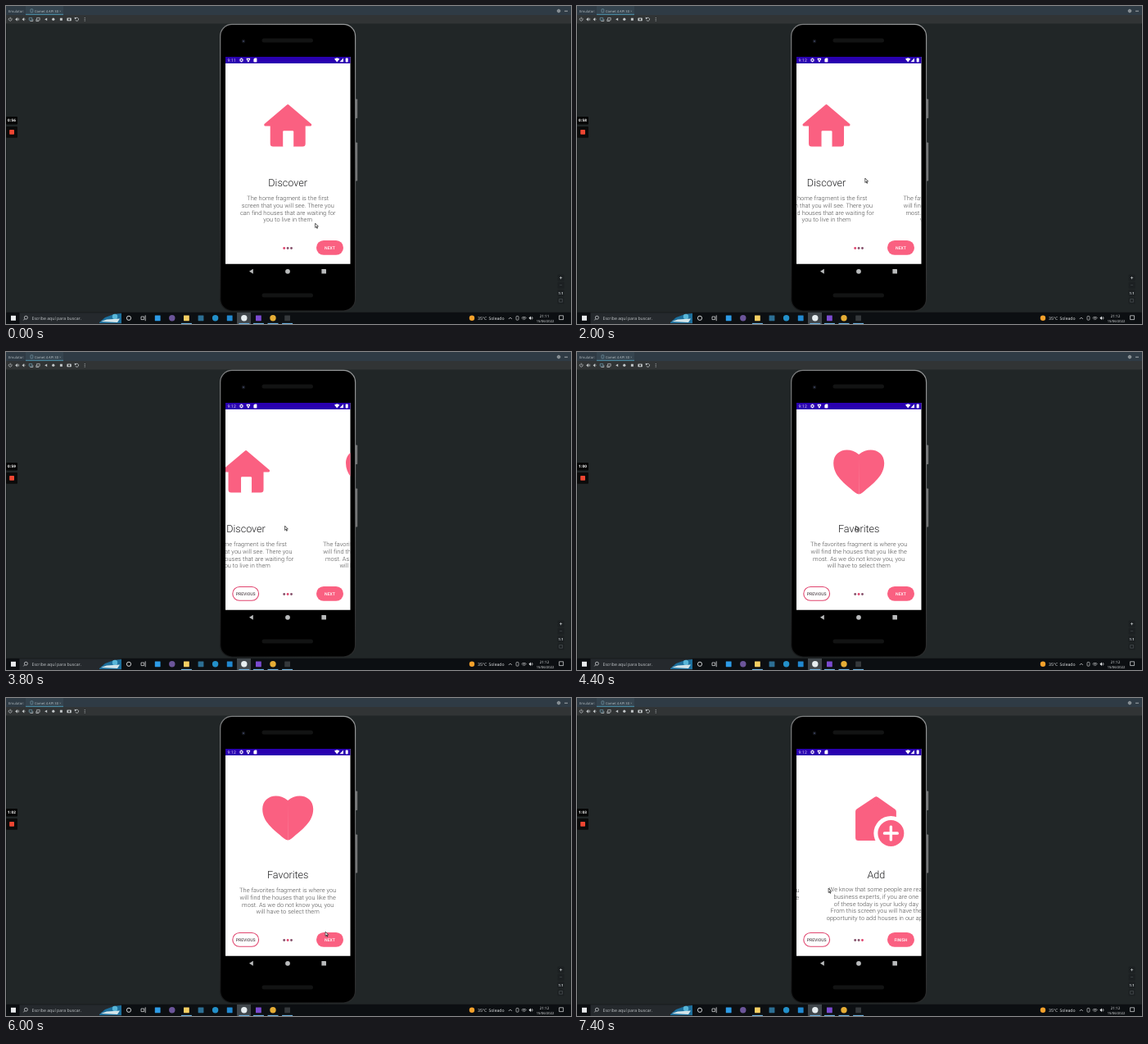
These frames come from a looping animation (690 by 388 pixels, 7.5 s). An HTML page with a canvas:

```html
<!DOCTYPE html>
<html lang="es">
<head>
<meta charset="utf-8">
<title>Onboarding demo</title>
<style>
html, body { margin: 0; width: 100%; height: 100%; overflow: hidden; background: #212627; }
canvas { display: block; width: 690px; height: 388px; }
</style>
</head>
<body>
<canvas id="stage"></canvas>
<script>
const W = 690, H = 388, LOOP = 7500, STEP = 100;
const PINK = '#fa6081', ROSE = '#e0446e', INK = '#c3c8ca', PURPLE = '#2900b0';
const ROBOTO = 'Roboto, sans-serif', UI = '"Open Sans", "Noto Sans", sans-serif';
const SCREEN = { x: 268, y: 62, w: 152.5, h: 252.7 };
const PAGE_W = 153, MID = 344.2;

const canvas = document.getElementById('stage');
const ctx = canvas.getContext('2d');
const dpr = window.devicePixelRatio || 1;
canvas.width = Math.round(W * dpr);
canvas.height = Math.round(H * dpr);
ctx.scale(dpr, dpr);
ctx.textRendering = 'geometricPrecision';
ctx.lineJoin = 'round';

// Each move: start, end, value(s) reached
const swipes = [
  [0, 1, 0], [1800, 2400, 1], [2800, 3000, .667], [3200, 3500, 0],
  [3610, 4100, 1], [4500, 5000, .805], [5100, 5400, 1], [7000, 7522, 2]
];
const pointer = [
  [0, 1, 377.6, 265], [300, 1000, 370.6, 212], [1800, 2200, 333, 208], [2800, 3000, 384, 208],
  [3400, 3800, 340.5, 212], [4500, 5000, 388, 206.5], [5400, 5800, 390, 285],
  [6000, 6500, 384, 230], [7000, 7300, 307, 232]
];

const pages = [
  { title: 'Discover', icon: house, top: 237.2, lines: [
    'The home fragment is the first', 'screen that you will see. There you',
    'can find houses that are waiting for', 'you to live in them'] },
  { title: 'Favorites', icon: heart, top: 237.2, lines: [
    'The favorites fragment is where you', 'will find the houses that you like the',
    'most. As we do not know you, you', 'will have to select them'] },
  { title: 'Add', icon: addHouse, top: 236, lines: [
    'We know that some people are real', 'business experts, if you are one',
    'of these today is your lucky day', 'From this screen you will have the',
    'opportunity to add houses in our app'] }
];

const ease = k => k * k * (3 - 2 * k);

function follow(moves, t) {
  let at = moves[0].slice(2);
  for (const [start, end, ...to] of moves) {
    const k = ease(Math.min(1, Math.max(0, (t - start) / (end - start))));
    at = at.map((v, i) => v + (to[i] - v) * k);
  }
  return at;
}

function rect(x, y, w, h, fill, r = 0) {
  ctx.beginPath();
  ctx.roundRect(x, y, w, h, r);
  ctx.fillStyle = fill;
  ctx.fill();
}

function box(x, y, w, h, color, width = .7, r = 0) {
  ctx.beginPath();
  ctx.roundRect(x, y, w, h, r);
  ctx.strokeStyle = color;
  ctx.lineWidth = width;
  ctx.stroke();
}

const square = (x, y, size, fill, r) => rect(x - size / 2, y - size / 2, size, size, fill, r);

function disc(x, y, r, fill) {
  ctx.beginPath();
  ctx.arc(x, y, r, 0, Math.PI * 2);
  ctx.fillStyle = fill;
  ctx.fill();
}

function ring(x, y, r, color, width = .7, from = 0, to = Math.PI * 2) {
  ctx.beginPath();
  ctx.arc(x, y, r, from, to);
  ctx.strokeStyle = color;
  ctx.lineWidth = width;
  ctx.stroke();
}

function trace(pts) {
  ctx.beginPath();
  for (let i = 0; i < pts.length; i += 2) ctx.lineTo(pts[i], pts[i + 1]);
}

function line(color, width, ...pts) {
  trace(pts);
  ctx.strokeStyle = color;
  ctx.lineWidth = width;
  ctx.stroke();
}

// Filled polygon; a radius grows it with rounded corners
function poly(color, radius, ...pts) {
  trace(pts);
  ctx.closePath();
  ctx.fillStyle = ctx.strokeStyle = color;
  ctx.fill();
  ctx.lineWidth = radius * 2;
  if (radius) ctx.stroke();
}

function text(str, x, y, font, color, align = 'left', spacing = 0) {
  ctx.font = font;
  ctx.letterSpacing = spacing + 'px';
  ctx.fillStyle = color;
  ctx.textAlign = align;
  ctx.fillText(str, x, y);
}

function at(x, y, paint) {
  ctx.save();
  ctx.translate(x, y);
  paint();
  ctx.restore();
}

function house() {
  poly(PINK, 1.6, 0, 121.6, 27.4, 145, -27.4, 145);
  rect(-21.5, 140, 43, 31.5, PINK, 3.5);
  rect(-6, 152.3, 13, 20, '#fff', 1.2);
}

function heart() {
  ctx.fillStyle = PINK;
  for (const side of [-1, 1]) {
    ctx.beginPath();
    ctx.moveTo(0, 125);
    ctx.bezierCurveTo(side * 13, 114, side * 31, 120, side * 31, 135.5);
    ctx.bezierCurveTo(side * 31, 151, side * 18, 160, side * 4.5, 171.6);
    ctx.quadraticCurveTo(side * 2, 173.6, 0, 173.6);
    ctx.lineTo(-side * .2, 125);
    ctx.fill();
  }
}

function addHouse() {
  poly(PINK, 3.5, 0, 123.8, 21, 138.5, 21, 170.5, -21.8, 170.5, -21.8, 138.5);
  disc(18, 165, 21, '#fff');
  disc(18, 165, 16, PINK);
  rect(8.5, 163.3, 19, 3.4, '#fff', 1.5);
  rect(16.3, 155.5, 3.4, 19, '#fff', 1.5);
}

function gear(x, y, r, color) {
  for (let i = 0; i < 8; i++) ring(x, y, r * .9, color, r * .3, i * Math.PI / 4 - .2, i * Math.PI / 4 + .2);
  ring(x, y, r * .58, color, r * .42);
}

function speaker(x, y, waves, color = INK) {
  poly(color, 0, x - 2.2, y, x + .4, y - 2.2, x + .4, y + 2.2);
  for (let i = 1; i <= waves; i++) ring(x + .2, y, i * 1.1, color, .6, -.9, .9);
}

const tools = [
  () => { ring(0, 0, 1.9, INK, .7, -1, 4.1); line(INK, .7, 0, -2.6, 0, 0); },
  () => speaker(0, 0, 2),
  () => speaker(0, 0, 1),
  () => { box(-2.2, -1.8, 3.6, 2.8, '#6f9fb4'); line(INK, .7, -1, 2.3, 2.4, 2.3, 2.4, 0); },
  () => { box(-1.6, -1.8, 3.6, 2.8, INK); line(INK, .7, -2.4, 0, -2.4, 2.3, 1, 2.3); },
  () => poly(INK, 0, -1, 0, 2, -1.7, 2, 1.7),
  () => disc(.4, 0, 1.6, INK),
  () => square(.6, 0, 3, INK),
  () => { rect(-2, -1.8, 5.4, 3.8, INK, .6); disc(.7, .2, 1.1, '#313435'); },
  () => { ring(.4, 0, 2, INK, .8, -2.6, 2.6); poly(INK, 0, -2.6, -2.4, 0, -2, -2, .2); },
  () => { for (const y of [-1.8, 0, 1.8]) disc(0, y, .5, INK); }
];

function drawIde() {
  rect(0, 0, W, H, '#212627');
  rect(0, 0, W, 11, '#2f3b45');
  rect(24, 0, 46, 11, '#35444f');
  rect(24, 9.7, 46, 1.2, '#47849b');
  rect(0, 11, W, 10.5, '#313435');
  for (const x of [0, W - .8]) rect(x, 21.5, .8, 352, '#171c1e');
  text('Emulator:', 3, 7.8, '4.2px ' + UI, '#b4bdc1');
  box(30, 3.8, 2.8, 4, '#7fa6b5', .6, .5);
  text('Comet 4 API 30', 35, 7.8, '4.1px ' + UI, '#bcc6ca');
  text('×', 65, 7.8, '4.5px ' + UI, '#8b979c');
  gear(675, 6, 2.2, INK);
  line(INK, .8, 682, 6.2, 686, 6.2);
  tools.forEach((tool, i) => at(5.2 + 8.1 * i + .1 * i * i, 16.2, tool));

  for (let i = 0; i < 4; i++) square(677.6, 331.4 + i * 9.4, 8, '#1c2022', 1);
  text('+', 677.6, 333.7, 'bold 6.5px ' + UI, INK, 'center');
  text('−', 677.6, 343, '6.5px ' + UI, '#596164', 'center');
  text('1:1', 677.6, 351.8, 'bold 4.2px ' + UI, INK, 'center');
  box(675.6, 357.6, 4, 3.6, '#4c5457');
}

function drawPhone() {
  const rim = ctx.createLinearGradient(261, 372, 427, 22);
  rim.addColorStop(0, '#161718');
  rim.addColorStop(.5, '#48494a');
  rim.addColorStop(1, '#9a9c9d');
  for (const [y, h] of [[113.5, 23.5], [166.5, 47]]) rect(426.5, y, 2.7, h, '#77797a', .8);
  rect(261, 21.8, 166.2, 350.6, rim, 15);
  rect(262.3, 23, 163.7, 348.4, '#000', 14);
  disc(290, 43, 2.4, '#101216');
  disc(290, 43, 1.1, '#39405a');
  for (const y of [39.6, 350.6]) rect(312.5, y, 62.5, 5, '#121313', 2.5);
  rect(SCREEN.x, SCREEN.y, SCREEN.w, SCREEN.h, '#fff');
  poly('#b9bbbc', 0, 297, 323.8, 301.8, 320.8, 301.8, 326.8);
  disc(344, 323.8, 2.9, '#b9bbbc');
  square(388.2, 323.8, 5.6, '#b9bbbc', .4);
}

function drawStatusBar(late) {
  rect(SCREEN.x, SCREEN.y, SCREEN.w, 8, PURPLE);
  text(late ? '9:12' : '9:11', 270.6, 67.9, '5.1px ' + ROBOTO, '#dcd5f5', 'left', .15);
  gear(287.5, 66, 2.5, '#fff');
  poly('#fff', .6, 294.2, 64.4, 297.6, 64.4, 295.9, 68);
  disc(295.9, 65.6, .8, PURPLE);
  rect(302.4, 63.5, 4, 4.9, '#fff', [2, .4, .4, .4]);
  poly('#fff', 0, 401, 64.4, 404.2, 63.3, 407.4, 64.4, 404.2, 68.4);
  poly('#fff', 0, 412, 63.6, 412, 68.2, 407.6, 68.2);
  rect(414.7, 63.4, 3, 5, '#fff', .6);
}

function drawPage(page) {
  page.icon();
  text(page.title, 0, 219.6, '300 12.6px ' + ROBOTO, '#1c1c1e', 'center');
  page.lines.forEach((s, i) =>
    text(s, 0, page.top + i * 8.75, '300 7.4px ' + ROBOTO, '#4c4c4c', 'center', .07));
}

function drawApp(t) {
  const [pos] = follow(swipes, t);
  const last = t >= 7300;
  const hasPrev = t >= 2300 && (t < 3400 || t >= 3700);
  const current = last ? 2 : hasPrev ? 1 : 0;
  const label = '500 5.1px ' + ROBOTO;

  ctx.save();
  ctx.beginPath();
  ctx.rect(SCREEN.x, SCREEN.y, SCREEN.w, SCREEN.h);
  ctx.clip();
  pages.forEach((p, i) => {
    if (Math.abs(i - pos) < 1) at(MID + (i - pos) * PAGE_W, 0, () => drawPage(p));
  });
  ctx.restore();

  rect(379, 286, 33, 17.8, PINK, 8.9);
  text(last ? 'FINISH' : 'NEXT', 395.5, 296.8, label, '#fff', 'center');
  if (hasPrev) {
    box(276.8, 286.5, 31.8, 16.8, ROSE, 1.1, 8.4);
    text('PREVIOUS', 292.7, 296.8, label, '#5c5056', 'center');
  }
  for (let i = 0; i < 3; i++) disc(339.7 + i * 4.4, 295.5, 1.4, i === current ? ROSE : '#85506a');
  drawStatusBar(t >= 1900);
}

// Evenly spaced taskbar icons: color, shape, running
const apps = [
  ['#e4e6e8', 'ring'], ['#e4e6e8', 'view'], ['#2d9be6', 'square'], ['#6b5599', 'disc'],
  ['#f5cf62', 'square', true], ['#2c6f94', 'square'], ['#2390c9', 'disc'], ['#2188d0', 'square'],
  ['#e6edf0', 'disc', true], ['#7b4bd0', 'square', true], ['#e6ad35', 'disc', true], ['#34383b', 'square', true]
];
const appShapes = {
  ring: (x, y, c) => ring(x, y, 2.6, c, .9),
  disc: (x, y, c) => disc(x, y, 3.7, c),
  square: (x, y, c) => square(x, y, 6.8, c, .4),
  view: (x, y, c) => { box(x - 2.6, y - 1.8, 3.6, 3.6, c); line(c, .8, x + 2.6, y - 3.4, x + 2.6, y + 3.4); }
};

function drawTaskbar(late) {
  const ink = '#e4e6e8', y = 380.8, font = '5.1px ' + UI;
  rect(0, 373.8, W, 14.2, '#0c0f12');
  square(9, y, 6, '#e8eaec');
  rect(16.5, 374.2, 124.5, 13.8, '#25292d');
  ring(24.4, 380.2, 2, ink);
  line(ink, .7, 22.9, 381.7, 21.3, 383.4);
  text('Escribe aquí para buscar.', 31.5, 382.9, '5.2px ' + UI, '#c3c7ca');
  poly('#1d6f9c', 0, 114, 386, 121, 380, 132, 376, 141, 375, 141, 387, 114, 387);
  disc(133, 379, 3.2, '#58b6d8');
  poly('#d3e5ea', 0, 116, 385, 123, 382.4, 139, 381.4, 136, 386);

  rect(282, 374, 17, 14, '#40464b');
  apps.forEach(([color, shape, running], i) => {
    const x = 150 + i * 17.6;
    appShapes[shape](x, y, color);
    if (running) rect(x - 6.5, 386.9, 13, 1.1, '#6fb2e0');
  });

  disc(569, y, 3.2, '#f5a12b');
  text('35°C', 576, 382.7, font, ink);
  text('Soleado', 589.5, 382.7, font, ink);
  line(ink, .7, 613.8, 382, 615.8, 380, 617.8, 382);
  box(623, 378.4, 3, 4.8, ink, .6, 1);
  for (let r = 1.4; r < 5; r += 1.4) ring(632.6, 383.6, r, ink, .6, -2.4, -.75);
  speaker(640.6, y, 2, ink);
  text(late ? '21:12' : '21:11', 657.5, 379.6, '4.5px ' + UI, ink, 'center');
  text('15/06/2022', 658.5, 386.2, '4.1px ' + UI, ink, 'center');
  box(675.6, 377.8, 5, 4.8, ink);
}

function drawRecorder(t) {
  const s = 56 + Math.floor((t + 100) / 1000);
  const clock = Math.floor(s / 60) + ':' + String(s % 60).padStart(2, '0');
  rect(0, 135, 14, 9.6, '#050505', 1);
  text(clock, 7.1, 141.4, 'bold 4.6px ' + UI, '#fff', 'center', .25);
  rect(0, 147, 14, 13.8, '#0b0b0b', 1);
  square(7.1, 153.9, 5.8, '#ee4632', .7);
}

function drawCursor() {
  poly('#3c3c3c', .3, 0, 0, 0, 5.6, 1.3, 4.4, 2.2, 6.4, 3, 6, 2.1, 4.1, 3.9, 4.1);
  poly('#fff', 0, .4, 1, .4, 4.7, 1.4, 3.8, 3, 3.8);
}

function draw(t) {
  drawIde();
  drawPhone();
  drawApp(t);
  drawTaskbar(t >= 1900);
  drawRecorder(t);
  at(...follow(pointer, t), drawCursor);
}

const start = performance.now();
let shown = -1;
function tick() {
  const elapsed = (performance.now() - start) % LOOP;
  const t = Math.floor(elapsed / STEP) * STEP;
  if (t !== shown) draw(shown = t);
  requestAnimationFrame(tick);
}
tick();
</script>
</body>
</html>
```
